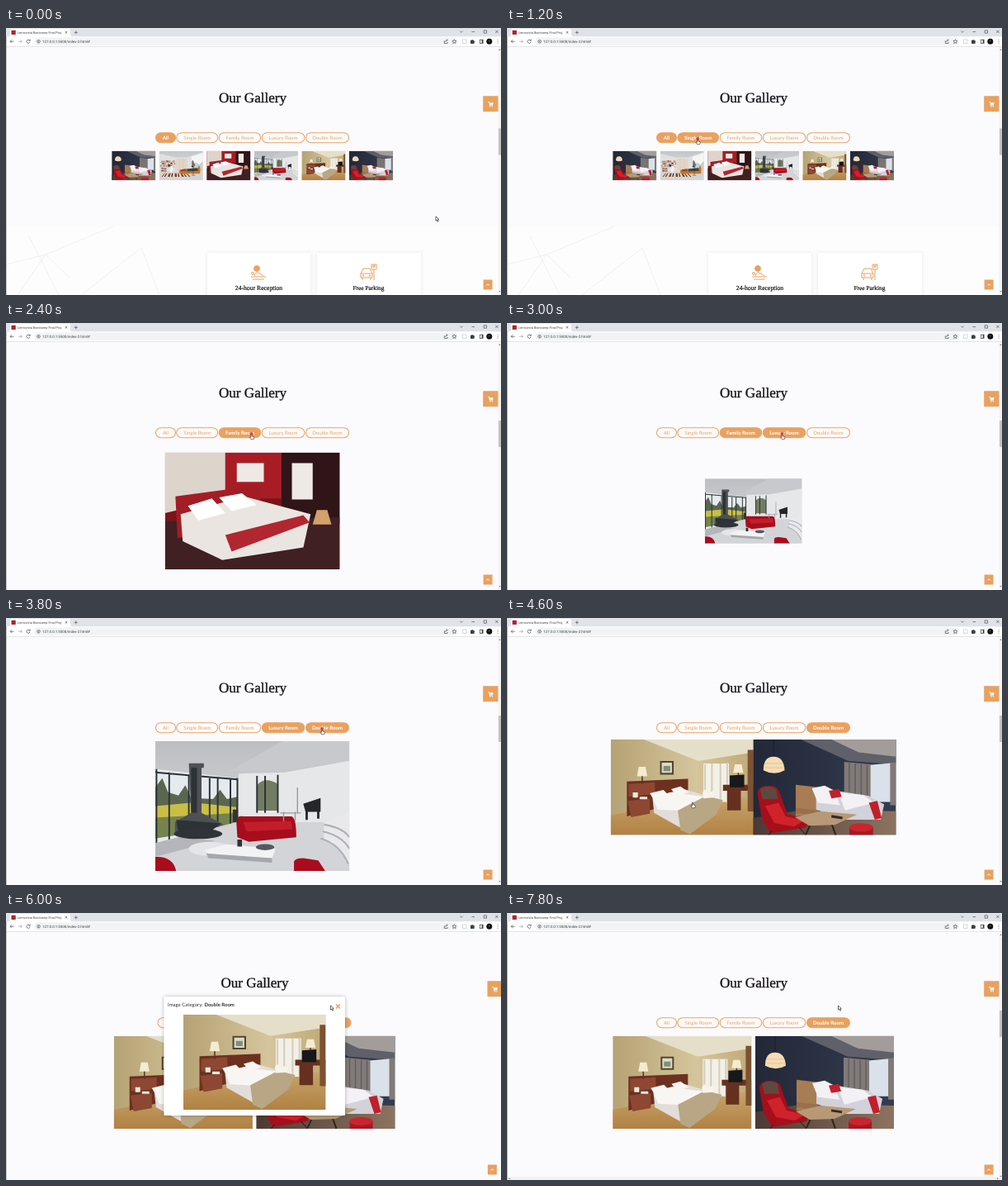
Animation of 600x323 px, one loop 8 s. Source, as an HTML page:

```html
<!DOCTYPE html>
<html lang="en">
<head>
<meta charset="utf-8">
<title>Gallery</title>
<style>
  html, body { margin: 0; width: 100%; height: 100%; overflow: hidden; background: #fbfafc; }
  svg { display: block; }
  text { text-rendering: geometricPrecision; }
  .ui { font-family: Roboto, sans-serif; fill: #3c4043; }
  .head { font-family: "Liberation Serif", serif; fill: #15131a; stroke: #15131a; text-anchor: middle; }
  .btn rect { fill: #fdfbfb; stroke: #e9a468; stroke-width: 1.1; }
  .btn text { font: 6.1px Lato, sans-serif; fill: #e9a468; text-anchor: middle; }
  .btn.on rect { fill: #e8a15f; }
  .btn.on text { fill: #fff; font-weight: 700; }
  .line { fill: none; stroke: #5f6368; stroke-width: .8; }
  .orange { fill: none; stroke: #e8a15f; stroke-width: 1; }
</style>
</head>
<body>
<svg width="600" height="323" viewBox="0 0 600 323">
  <defs>
    <linearGradient id="navy"><stop offset="0" stop-color="#232838"/><stop offset="1" stop-color="#343c50"/></linearGradient>
    <linearGradient id="carpet"><stop offset="0" stop-color="#4a3a34"/><stop offset="1" stop-color="#8d7460"/></linearGradient>
    <linearGradient id="beige"><stop offset="0" stop-color="#b5a274"/><stop offset=".6" stop-color="#d5c59c"/><stop offset="1" stop-color="#c0a878"/></linearGradient>
    <linearGradient id="wood" x2="0" y2="1"><stop offset="0" stop-color="#c6a36a"/><stop offset="1" stop-color="#b18143"/></linearGradient>
    <linearGradient id="pale" x2="0" y2="1"><stop offset="0" stop-color="#c3c6c8"/><stop offset="1" stop-color="#e6e7e8"/></linearGradient>
    <linearGradient id="stone" x2="0" y2="1"><stop offset="0" stop-color="#bcbec2"/><stop offset="1" stop-color="#dfe0e3"/></linearGradient>
    <filter id="soft" x="-20%" y="-20%" width="140%" height="140%"><feDropShadow dx="0" dy="0" stdDeviation="2" flood-color="#000" flood-opacity=".3"/></filter>
    <filter id="faint" x="-20%" y="-20%" width="140%" height="140%"><feDropShadow dx="0" dy="0" stdDeviation="2.5" flood-color="#000" flood-opacity=".09"/></filter>

    <symbol id="blue" viewBox="0 0 168 112">
      <path fill="url(#navy)" d="M0 0h168v112H0z"/>
      <path fill="#5f6069" d="M56 0H168V29L112 25z"/>
      <path fill="#a29d9b" d="M92 0H168V20L124 15z"/>
      <path fill="url(#carpet)" d="M0 92L60 82L168 84V112H0z"/>
      <path fill="#dbe1ea" d="M134 30L168 27V73H134z"/>
      <path fill="#807a78" d="M107 26L138 29V70H107zM161 27h7v50h-7z"/>
      <path stroke="#605c5c" stroke-width="1.4" d="M113 27v42M120 28v41M127 29v40M134 30v40"/>
      <path fill="#a87d55" d="M50 53L76 56V87L50 90z"/>
      <path fill="#d3d1d9" d="M74 68L98 60L136 66L154 76L150 94L108 94L74 82z"/>
      <path fill="#f3f1f5" d="M69 57L84 54L96 60L102 77L76 74zM100 62L130 65L142 74L108 83z"/>
      <path fill="#c01f2c" d="M89 60L101 58L104 67L92 69zM136 74L146 72L151 92L143 94z"/>
      <path fill="#9a704c" d="M50 80L76 83L74 89L50 86z"/>
      <path stroke="#1b1d26" d="M24 0V22"/>
      <path fill="#f5dcb4" d="M12 36Q12 20 24 20T37 36Q25 43 12 36z"/>
      <path stroke="#ddba8a" stroke-width=".7" d="M14 28h21M12 33h25"/>
      <path fill="#a50f1b" d="M5 63Q6 54 18 54T32 65L40 87L66 95L62 103L20 110L10 92z"/>
      <path fill="#d0222b" d="M14 78L30 74L38 90L60 95L48 102L25 98z"/>
      <path fill="#5d4940" d="M8 58Q18 52 27 58L29 70L11 70z"/>
      <path stroke="#3a1a22" d="M22 107l-4 5M54 103l8 9"/>
      <path stroke="#2e2522" stroke-width="2" d="M68 98l-6 13M92 98l5 14"/>
      <path fill="#b79975" d="M49 91L79 84L122 88L96 100L66 101z"/>
      <path stroke="#332a2a" stroke-width="3" d="M92 90l13 2"/>
      <path fill="#a81722" d="M113 103v9h28v-9z"/>
      <ellipse cx="127" cy="103" rx="14" ry="5" fill="#c9252e"/>
    </symbol>

    <symbol id="study" viewBox="0 0 168 112">
      <path fill="url(#pale)" d="M0 0h168v112H0z"/>
      <path fill="#dfe0e1" d="M0 10L60 24H108L168 4V84H0z"/>
      <path fill="#f4f5f5" d="M124 22L168 8V75H124z"/>
      <path fill="#c9d0ce" d="M124 52L142 44L154 52L168 38V77H124z"/>
      <path fill="#6d7767" d="M125 40q4-10 7 0l6 14-13 10z"/>
      <path fill="#d6d4d3" d="M0 78H168V112H0z"/>
      <path fill="#e2d5c5" d="M62 29H108V77H62z"/>
      <path stroke="#bfae98" stroke-width=".7" d="M77 29v48M92 29v48"/>
      <g id="shelves"></g>
      <path fill="#d9c9be" d="M4 60H60V63H4zM6 63H30V82H6z"/>
      <path fill="#7c5547" d="M8 65h8v4H8zM18 66h9v4h-9zM8 73h9v5H8zM19 74h8v4h-8z"/>
      <path fill="#35383d" d="M33 52h9v7h-9z"/>
      <path fill="#f5f5f6" d="M43 57h9v14h-9zM39 71h14l-3 5v6h-8v-6z"/>
      <g id="rug"></g>
      <path fill="#c87526" d="M77 75Q80 70 88 74L145 73L152 56Q160 58 157 87L80 87Q75 82 77 75z"/>
      <path fill="#3d4045" d="M106 69L147 65L149 76L108 78z"/>
      <path fill="#8d4a33" d="M82 71L104 68L105 77L84 77z"/>
      <path stroke="#292a2d" stroke-width="1.4" fill="none" d="M124 93H138M131 92V61L137 56"/>
      <path fill="#292a2d" d="M122 60l7-4 5 6z"/>
    </symbol>

    <symbol id="red" viewBox="0 0 168 112">
      <path fill="#78141a" d="M0 0h168v112H0z"/>
      <path fill="#ddd4cc" d="M0 0H58V44L0 58z"/>
      <path fill="#a81d25" d="M58 0H112V44H58z"/>
      <path fill="#2f1418" d="M112 0H168V68H112z"/>
      <path fill="#efe9e5" d="M122 10h20v35h-20zM69 10h26v18H69z"/>
      <path fill="#402022" d="M0 66L168 62V112H0z"/>
      <path fill="#a31d25" d="M10 42L92 31V73L12 82z"/>
      <path fill="#ebe5e2" d="M15 59L76 42L140 59L133 91L55 103L17 85z"/>
      <path fill="#fff" d="M22 51L45 44L58 58L32 65zM52 43L74 39L88 50L64 56z"/>
      <path fill="#b22630" d="M58 79L133 60L139 67L64 95z"/>
      <path fill="#d3a16b" d="M146 55h10l4 14h-18z"/>
    </symbol>

    <symbol id="living" viewBox="0 0 168 112">
      <path fill="url(#stone)" d="M0 0h168v112H0z"/>
      <path fill="#c8c9cc" d="M64 26H112L168 17V0H110z"/>
      <path fill="#e6e7e9" d="M72 28L112 27L168 17V72H72z"/>
      <path fill="#e4eaee" d="M0 24L71 32V74L0 88z"/>
      <path fill="#5b6650" d="M0 40L6 32L11 44L20 47L26 38L31 49L50 50L56 42L62 50L71 48V64L0 68z"/>
      <path fill="#c9bf45" d="M0 56L33 53L70 57V64L0 68z"/>
      <path fill="#76834f" d="M0 66L71 62V73L0 84z"/>
      <path fill="#737b63" d="M88 38Q95 30 106 37V60H88z"/>
      <path stroke="#2b3236" stroke-width="1.4" fill="none" d="M0 27L71 33M1 24v66M12 27v60M29 30v52M47 32v42M54 32v42M65 32v40M71 32v40M88 30v32M95 30v32M106 29v33"/>
      <path fill="#d3d4d8" d="M0 88L70 70H168V112H0z"/>
      <path fill="#b4b6bb" d="M0 88L20 83L52 86L0 100z"/>
      <ellipse cx="47" cy="93" rx="18" ry="6" fill="#e4e5e9"/>
      <path fill="#4d5156" d="M29 19h13v4h-2v39l19 10-18 7H17V70l14-8z"/>
      <path fill="#2d3236" d="M31 23h5v39h-5zM18 68L57 71L45 80L20 79z"/>
      <ellipse cx="37" cy="80" rx="21" ry="4.5" fill="#303337"/>
      <path fill="#a60d1d" d="M70 68Q71 64 77 65L118 65Q122 66 122 83L81 87L71 83z"/>
      <path fill="#c31d2b" d="M76 70L117 69L119 76L79 78z"/>
      <path fill="#f3f3f5" d="M43 94L62 89L104 93L101 101L47 99z"/>
      <path fill="#a5a7ac" d="M44 97L101 101V105L46 101z"/>
      <ellipse cx="95" cy="91.5" rx="8" ry="2.7" fill="#56585f"/>
      <path fill="#333" d="M71 85h4v6h-4zM67 59h4v11h-4z"/>
      <path fill="#24262a" d="M128 54L143 49V61H130zM130 61h2v7h-2zM140 60h2v7h-2z"/>
      <path fill="#e9e9ec" d="M146 70L168 61V107Q160 91 146 86z"/>
      <path stroke="#aeb0b5" stroke-width="1.5" fill="none" d="M146 72Q163 75 168 83M145 78Q162 82 168 93M143 84Q160 89 167 106"/>
      <path stroke="#999ba0" fill="none" d="M108 62h18M111 61v8M121 61v8M123 40v22"/>
      <path fill="#a90d1d" d="M0 100Q15 99 18 112H0zM120 104Q121 101 128 101L141 103L147 112H120z"/>
    </symbol>

    <symbol id="double" viewBox="0 0 168 112">
      <path fill="url(#beige)" d="M0 0h168v112H0z"/>
      <path fill="#e5dfca" d="M39 0H168V15L103 25z"/>
      <path fill="url(#wood)" d="M0 89L104 68H168V112H0z"/>
      <path fill="#f3f0e7" d="M109 28H139V73H109z"/>
      <path stroke="#d5cdbc" stroke-width="2" d="M111 29v44M119 28v43M129 28v43M137 27v47"/>
      <path fill="#6d301f" d="M19 49L91 46V71L19 90z"/>
      <path fill="#8d4732" d="M21 52L52 50V64L21 67zM20 72L46 69V87L24 91z"/>
      <path fill="#f4ecd0" d="M33 32h8l2 11H31zM146 29h8l2 10h-12z"/>
      <path stroke="#613225" stroke-width="1.5" d="M37 43v9M150 39v7"/>
      <path fill="#54452e" d="M58 25h16v16H58z"/>
      <path fill="#dbdbc7" d="M60 27h12v12H60z"/>
      <path fill="#7d9078" d="M62 31h8v6h-8z"/>
      <path fill="#e2ddd8" d="M49 67L86 58L132 71L122 88L92 109L51 86z"/>
      <path fill="#f8f6f3" d="M50 70L70 62L129 69L98 84L55 82zM46 63L62 59L71 68L52 73zM71 58L82 55L92 62L78 66z"/>
      <path fill="#b9a685" d="M79 83L112 66L132 71L124 88L93 111L82 106z"/>
      <path fill="#f6f3ed" d="M108 62q4-7 6 1l7-3q3 5 0 8l-12 1z"/>
      <path fill="#66301f" d="M132 53H168V60H132zM137 60h16v23h-16zM163 60h5v24h-5z"/>
      <path fill="#17181b" d="M140 42L157 41V56H140z"/>
      <path fill="#7c5232" d="M161 12h7v72h-7z"/>
      <path fill="#ece8da" d="M26 62h6v6h-6zM34 67h9v3h-9z"/>
    </symbol>
  </defs>

  <path fill="#fbfafc" d="M0 0h600v323H0z"/>
  <g id="below">
    <path fill="#fefdfe" d="M1 240H596V323H1z"/>
    <path stroke="#f1eff1" fill="none" d="M14 323L48 274L77 302M28 252L64 323M48 274L130 240M91 323L164 266M164 266L186 323M0 286L48 274"/>
    <path fill="#fff" filter="url(#faint)" d="M244 272H369V330H244zM377 272H503V330H377z"/>
    <g class="orange">
      <circle cx="304" cy="291" r="3.4" fill="#e8a15f"/>
      <path d="M297 301H315M299 304H313M301 300Q302 294 308 297L312 300"/>
      <circle cx="299" cy="297" r="1.5"/>
      <path d="M430 302V297L433 291H441L444 297V302zM430 297H444M432 302v3M442 302v3M443 286h6v6h-6zM446 292v13M445 290v-3h2v2h-2"/>
      <circle cx="433" cy="299.5" r=".8"/><circle cx="441" cy="299.5" r=".8"/>
    </g>
    <text class="head" font-size="7.7" stroke-width=".2" x="306.5" y="317">24-hour Reception</text>
    <text class="head" font-size="7.4" stroke-width=".2" x="439.5" y="317">Free Parking</text>
  </g>

  <g id="page">
    <text class="head" font-size="17.1" stroke-width=".35" x="299" y="90">Our Gallery</text>
    <g id="buttons"></g>
    <g id="gallery"></g>
  </g>

  <g id="fixed">
    <path fill="#e8a15f" d="M578.2 82.3h19v19h-19zM578.6 304.6h11v12h-11z"/>
    <path fill="none" stroke="#fff" stroke-width=".8" d="M584 89.5h1.5l1 4.5h3.5"/>
    <path fill="#fff" d="M585.7 90.2h5l-.8 3h-3.5z"/>
    <circle cx="586.8" cy="95.1" r=".7" fill="#fff"/><circle cx="589.7" cy="95.1" r=".7" fill="#fff"/>
    <path fill="none" stroke="#fff" stroke-width="1" d="M582.2 311.6l1.9-1.9 1.9 1.9"/>
  </g>
  <g id="bar">
    <path fill="#f4f3f4" d="M596.5 23h3.5v300h-3.5z"/>
    <path fill="#777" d="M597.2 27l1.2-1.6 1.2 1.6zM597.2 318l1.2 1.6 1.2-1.6z"/>
    <rect id="thumb" x="597" width="3" height="32" fill="#c3c3c4"/>
  </g>
  <g id="hbar">
    <path fill="#f3f2f3" d="M0 319h600v4H0z"/>
    <path fill="#777" d="M3.5 320l-1.5 1.2 1.5 1.2zM594 320l1.5 1.2-1.5 1.2z"/>
  </g>

  <g id="modal">
    <rect x="191.5" y="101.5" width="219.5" height="143.5" rx="1" fill="#fff" filter="url(#soft)"/>
    <text x="196" y="112.5" font-family="Lato, sans-serif" font-size="6" fill="#333">Image Category: <tspan font-weight="700">Double Room</tspan></text>
    <path stroke="#e8a15f" stroke-width="1.6" d="M400 110.5l5 5m0-5l-5 5"/>
    <use href="#double" x="215" y="123" width="172.5" height="115"/>
  </g>

  <path fill="#dfe2e7" d="M0 0h600v10.5H0z"/>
  <path fill="#fff" d="M0 10.5h600v12H0zM3 10.5Q5 10 5 8V3Q5 1 7 1H76Q78 1 78 3V8Q78 10 80 10.5z"/>
  <path fill="#dcdde0" d="M0 22.3h600v.7H0z"/>
  <rect x="6.5" y="2.8" width="5.2" height="5.2" fill="#a8262b"/>
  <text class="ui" x="14" y="7" font-size="3.85">Lernovista Bootcamp Final Proj</text>
  <path class="line" d="M71.7 4l2.6 2.6m0-2.6l-2.6 2.6M82.8 5.4h4M84.8 3.4v4M550.4 3.8l1.6 1.6 1.6-1.6M564.5 4.6h3.5M579.2 2.9h3.3v3.3h-3.3zM593.3 2.8l3.2 3.2m0-3.2l-3.2 3.2"/>
  <rect x="34" y="11.6" width="514" height="9.5" rx="4.75" fill="#f1f3f4"/>
  <path class="line" d="M9.5 16.3h-4.5l2-2m-2 2l2 2"/>
  <path class="line" opacity=".5" d="M14.8 16.3h4.5l-2-2m2 2l-2 2"/>
  <path class="line" d="M28.7 15a2.1 2.1 0 1 0 .3 1.9M29.2 13.6v1.8h-1.8"/>
  <circle class="line" cx="39.5" cy="16.3" r="1.8" stroke-width=".5"/>
  <path class="line" stroke-width=".6" d="M39.5 16v1.4M39.5 15v.4"/>
  <text class="ui" x="44" y="18" font-size="4.4">127.0.0.1:5500/index-2.html#</text>
  <path class="line" stroke-width=".6" d="M531.3 15.3v3.2h3.8v-1.5M532.6 17q0-2.4 2.4-2.4m-1-1.2l1.2 1.2-1.2 1.2M543.4 13.8l.7 1.6 1.8.2-1.3 1.2.4 1.8-1.6-1-1.6 1 .4-1.8-1.3-1.2 1.8-.2z"/>
  <rect x="553.5" y="14" width="4.5" height="4.5" fill="none" stroke="#c9dde4"/>
  <path fill="#3c4043" d="M563 14.8h1.4q.7-1.6 1.6 0h1.5v1.3q1.5.8 0 1.7v1.2H563z"/>
  <path fill="#3c4043" d="M574 13.8h4.5v5H574z"/><path fill="#fff" d="M574.7 14.5h2v3.6h-2z"/>
  <circle cx="585.8" cy="16.3" r="3.5" fill="#111"/>
  <text x="585.8" y="17.4" font-family="Roboto, sans-serif" font-size="3" fill="#ccc" text-anchor="middle">T</text>
  <path fill="#5f6368" d="M595.6 13.7h.9v.9h-.9zM595.6 15.8h.9v.9h-.9zM595.6 17.9h.9v.9h-.9z"/>
  <path fill="#b9babd" d="M0 10h.8v313H0z"/>

  <g id="cursor">
    <path id="arrow" fill="#fff" stroke="#222" stroke-width=".7" d="M0 0V5.2L1.2 4.2L2.2 6.2L3.1 5.8L2.2 3.8L3.8 3.7z"/>
    <g id="hand">
      <path fill="#fff" stroke="#222" stroke-width=".6" d="M-.6.3q.6-.8 1.2 0v2.5l2.4.7q.6.3.3 1.2L2.7 6.8H-.4L-2.2 4.3q0-.9 1.6.2z"/>
      <circle id="glow" cy="-.2" r="1.9" fill="#e02424" opacity=".8"/>
    </g>
  </g>
</svg>

<script>
const $ = id => document.getElementById(id);
const LOOP = 8000, STEP = 200, BOUNCE = 500;

// Small parts of the study room
let seed = 7;
const rand = () => (seed = seed * 16807 % 2147483647) / 2147483647;
const tints = ["#a9362e", "#6a4435", "#d3b48e", "#b56b43", "#efe7de"];
let books = "";
for (let row = 0; row < 3; row++) {
  for (let x = 5; x < 59; x += 4) {
    const h = 3 + rand() * 4;
    books += `<rect x="${x}" y="${42 + row * 9 - h}" width="3.2" height="${h}" fill="${tints[rand() * 5 | 0]}"/>`;
  }
  books += `<path fill="#9c6c55" d="M3 ${42 + row * 9}h57v1.2H3z"/>`;
}
$("shelves").innerHTML = books;
const bands = ["#a82228", "#f0eee8", "#272629", "#d9bb68", "#ece8e2", "#54382f"];
$("rug").innerHTML = Array.from({ length: 24 }, (_, i) => {
  const a = 20 + i * 3.6, b = 9 + i * 4.6;
  return `<path fill="${bands[i % 6]}" d="M${a} 85h3.6L${b + 4.6} 99h-4.6z"/>`;
}).join("");

const buttons = [["All", 181.5, 24], ["Single Room", 206.8, 49.8], ["Family Room", 258.2, 50.5],
  ["Luxury Room", 310.3, 51.5], ["Double Room", 363.5, 52]];
$("buttons").innerHTML = buttons.map(([name, x, w]) =>
  `<g class="btn"><rect x="${x}" y="126.7" width="${w}" height="12" rx="6"/><text x="${x + w / 2}" y="135">${name}</text></g>`).join("");

const rooms = [["blue", "study", "red", "living", "double", "blue"],
  ["blue", "study"], ["red"], ["living"], ["double", "blue"]];

// Start time of each filter, in button order
const starts = [-BOUNCE, 1400, 2200, 3000, 4300];
// Photo scale at equal parts of the bounce
const bounces = [.5, 1.1, .9, 1.03, .97, 1];
// [time, opacity]
const fades = [[0, 0], [5200, .6], [5400, 1], [7200, .6], [7400, 0]];
// [time, x, y]
const path = [[0, 521, 228], [1200, 231, 134], [1400, 231, 134], [2000, 285, 134], [2200, 285, 134],
  [2800, 333, 134], [3000, 333.5, 134], [3800, 383, 134], [4300, 383, 134], [4600, 225, 223],
  [5200, 225, 223], [6000, 393.5, 112], [6400, 401.5, 112], [LOOP, 401.5, 112]];

const filterAt = t => starts.filter(s => s <= t).length - 1;

function bounce(p) {
  if (p >= 1) return 1;
  const n = p * 5, i = Math.floor(n + 1e-6), k = 1 - (1 - (n - i)) ** 3;
  return bounces[i] + (bounces[i + 1] - bounces[i]) * k;
}

function pointer(t) {
  const i = path.findIndex(row => row[0] > t);
  const [t0, x0, y0] = path[i - 1], [t1, x1, y1] = path[i];
  const k = (t - t0) / (t1 - t0), e = k * k * (3 - 2 * k);
  return [x0 + (x1 - x0) * e, y0 + (y1 - y0) * e];
}

function photos(set, scale) {
  const n = rooms[set].length;
  const [x0, y0, gap, w, h] = n === 6 ? [128.2, 148.8, 57.55, 53, 35.4]
    : n === 2 ? [128.2, 148.8, 172.7, 168.2, 112.1] : [181, 149, 0, 235.3, 156.9];
  return rooms[set].map((room, i) => {
    const cx = x0 + i * gap + w / 2, cy = y0 + h / 2;
    return `<use href="#${room}" x="${cx - w * scale / 2}" y="${cy - h * scale / 2}" width="${w * scale}" height="${h * scale}"/>`;
  }).join("");
}

const show = (id, on) => $(id).style.display = on ? "" : "none";
const move = (id, x, y) => $(id).setAttribute("transform", `translate(${x} ${y})`);

function draw(t) {
  const set = filterAt(t);
  const active = filterAt(t - 60); // button colours lag the click
  const fade = fades.filter(row => row[0] <= t).pop()[1], open = fade > 0;
  const [x, y] = pointer(t);
  const inRow = y > 126 && y < 139;

  $("gallery").innerHTML = photos(set, bounce((t - starts[set]) / BOUNCE));
  [...$("buttons").children].forEach((el, i) => {
    const [, left, w] = buttons[i];
    el.classList.toggle("on", i === active || inRow && x > left && x < left + w);
  });
  show("below", set === 0);
  show("bar", !open);
  show("hbar", t >= 7400);
  $("thumb").setAttribute("y", set === 0 ? 121.5 : 118);
  move("page", open ? 2.5 : 0, 0);
  move("fixed", open ? 5.3 : 0, 0);
  show("modal", open);
  $("modal").setAttribute("opacity", fade);

  const hand = inRow || set === 4 && !open && t < 5400;
  show("hand", hand);
  show("arrow", !hand);
  show("glow", inRow);
  move("cursor", x, y);
}

const start = performance.now();
let shown = -1;
function tick() {
  const t = Math.floor((performance.now() - start) % LOOP / STEP) * STEP;
  if (t !== shown) draw(shown = t);
  requestAnimationFrame(tick);
}
tick();
</script>
</body>
</html>
```
